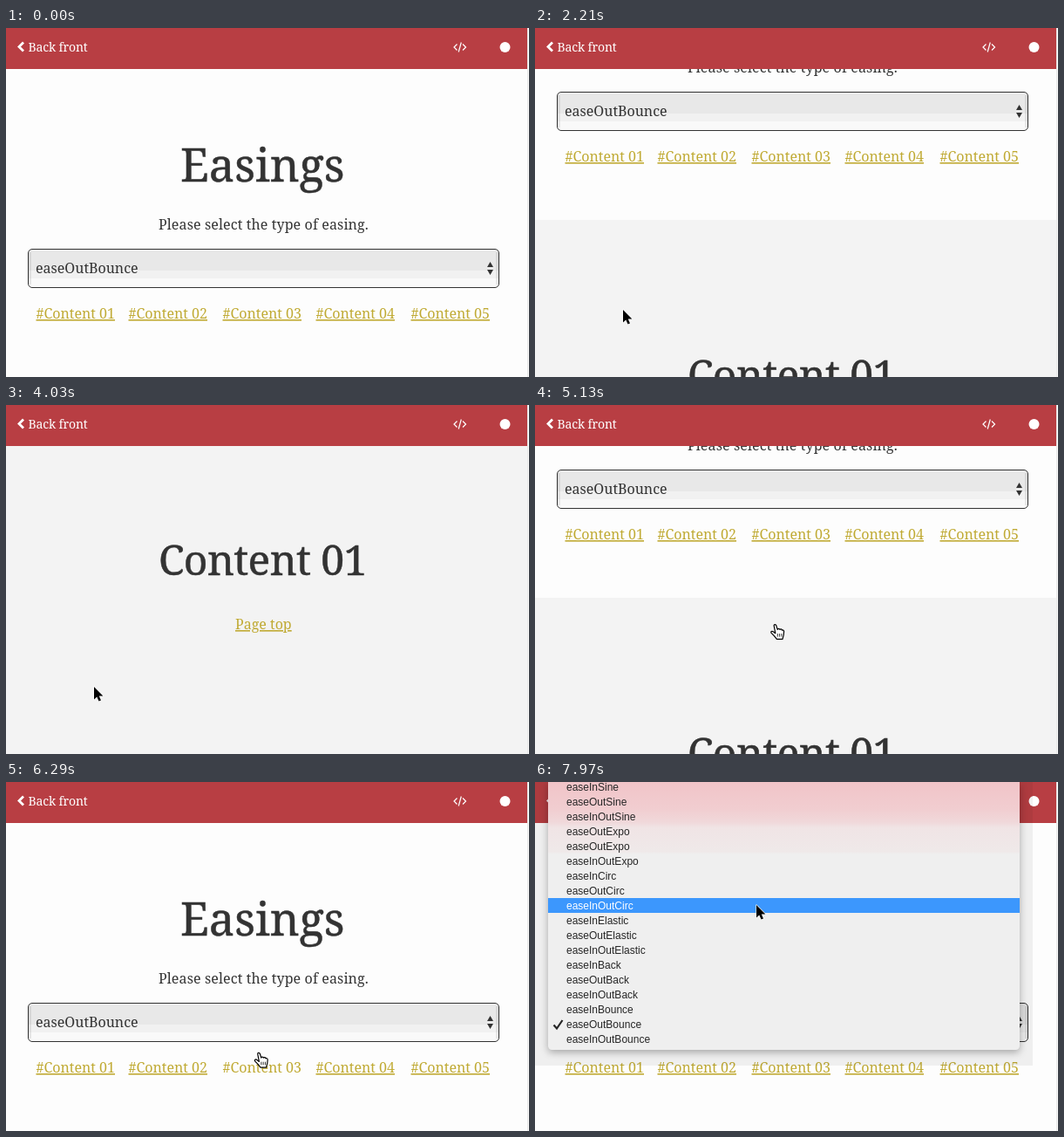
An HTML page that plays this animation: 600x400 px, repeating every 8 s.

```html
<!DOCTYPE html>
<html lang="en">
<head>
<meta charset="utf-8">
<title>Easings</title>
<style>
  html, body { margin: 0; width: 100%; height: 100%; overflow: hidden; background: #fdfdfd; }
  svg { display: block; }
  text { font: 16px "Noto Serif", serif; fill: #333; white-space: pre; }
  .title { stroke: #333; stroke-width: .5; }
  .link { fill: #c0aa33; text-decoration: underline 1px; text-underline-offset: 2px; }
  .link.hover { text-decoration: none; }
  #menu text { font: 12px "Liberation Sans", Arial, sans-serif; fill: #262626; }
  #menu text.on { fill: #fff; }
  #panel { filter: drop-shadow(0 3px 4px rgba(0, 0, 0, .3)); }
</style>
</head>
<body>
<svg width="600" height="400" viewBox="0 0 600 400">
  <defs>
    <linearGradient id="tint" x2="0" y2="1">
      <stop offset="0" stop-color="#f1c4c8"/>
      <stop offset=".1" stop-color="#f1cdd0"/>
      <stop offset=".15" stop-color="#f0d8da"/>
      <stop offset=".17" stop-color="#f0e4e5"/>
      <stop offset=".26" stop-color="#efe9e9"/>
      <stop offset=".27" stop-color="#efefef"/>
    </linearGradient>
  </defs>

  <g id="page">
    <rect width="598" height="400" fill="#fdfdfd"/>
    <text class="title" x="200" y="176" style="font-size:52.5px">Easings</text>
    <text x="175" y="231" letter-spacing=".12">Please select the type of easing.</text>
    <rect x="25.5" y="253.5" width="540" height="44" rx="4.5" fill="#f9f9f9"/>
    <path d="M26 287V258q0-4 4-4H561q4 0 4 4V287z" fill="#f1f1f1"/>
    <path d="M26 278V258q0-4 4-4H561q4 0 4 4V278z" fill="#e8e8e8"/>
    <path d="M27.5 257V294M563.5 257V294" stroke="#000" stroke-opacity=".07" stroke-width="3"/>
    <rect x="25.5" y="253.5" width="540" height="44" rx="4.5" fill="none" stroke="#333"/>
    <path d="M552 274l3.5-6 3.5 6zM552 277h7l-3.5 6z" fill="#333"/>
    <text x="34" y="281">easeOutBounce</text>
    <g id="links"></g>
    <g transform="translate(0 400)">
      <rect width="598" height="400" fill="#f3f3f3"/>
      <text class="title" x="175" y="195" style="font-size:48px" letter-spacing="-.6">Content 01</text>
      <text class="link" id="pageTop" x="263" y="257">Page top</text>
    </g>
  </g>

  <rect x="598" width="2" height="400" fill="#f7f7f7"/>
  <rect x="598" width="1" height="400" fill="#e9e9e9"/>
  <rect width="598" height="47" fill="#b83e43"/>
  <g fill="none" stroke="#fff">
    <path d="M20 16.5l-5 5 5 5" stroke-width="2.8"/>
    <path d="M517.5 18.5l-3.5 3.5 3.5 3.5M524 18.5l3.5 3.5-3.5 3.5M522.3 16.5l-3.1 11" stroke-width="1.2"/>
  </g>
  <circle cx="572.5" cy="22" r="6" fill="#fff"/>
  <text x="25.5" y="27" letter-spacing="-.15" style="font-size:14px;fill:#fff">Back front</text>

  <g id="menu">
    <path d="M0 0H571V325H0z" fill-opacity=".055"/>
    <path id="panel" d="M15 0H556V302q0 5-5 5H20q-5 0-5-5z" fill="url(#tint)"/>
    <rect id="bar" x="15" width="541" height="17" fill="#3c97fd"/>
    <path id="check" d="M21.5 278.5l3.5 4 6.5-9.5" fill="none" stroke-width="2.2"/>
  </g>

  <g id="cursor" stroke-linejoin="round">
    <path id="arrow" d="M0 0V14.5L3.3 11.4 5.5 16.6 8 15.5 5.8 10.5H10.4z" stroke="#fff" stroke-width="1.2" paint-order="stroke"/>
    <g id="hand" stroke="#000" stroke-width="1.2">
      <path d="M-.8 2.2C-1.2.4 1.2 0 1.8 1.8L3.2 6.4C3.6 5 5.6 5 5.9 6.5 6.6 5.5 8.1 5.7 8.4 7.1 9.6 6.5 10.7 7.3 10.6 8.8L10.2 12.6 9 17.4H2.4L-.6 13.6-3.8 10.4C-5 8.8-3.2 7.6-1.7 8.8L.8 10.7z" fill="#fff"/>
      <path d="M3.3 11v3.6M5.6 11v3.6M7.9 11v3.6" stroke-width=".8"/>
    </g>
  </g>
</svg>
<script>
const LOOP = 8000, PAGE = 400, SCROLL = 800, MENU_OPEN = 7220;
const $ = id => document.getElementById(id);

function addText(parent, content, x, y, className = "") {
  const el = document.createElementNS("http://www.w3.org/2000/svg", "text");
  el.textContent = content;
  el.setAttribute("x", x);
  el.setAttribute("y", y);
  el.setAttribute("class", className);
  parent.append(el);
  return el;
}

const links = [35, 141, 249, 356, 465].map((x, i) =>
  addText($("links"), "#Content 0" + (i + 1), x - .5, 333, "link"));

const names = ("InSine OutSine InOutSine OutExpo OutExpo InOutExpo InCirc OutCirc InOutCirc InElastic " +
  "OutElastic InOutElastic InBack OutBack InOutBack InBounce OutBounce InOutBounce").split(" ");
const rows = names.map((name, i) => addText($("menu"), "ease" + name, 36, 10 + 17 * i));
const selected = names.indexOf("OutBounce");

// Pointer positions: time, x, y
const path = [
  [600, 246, 404], [1250, 122, 306], [1460, 112, 317], [1740, 101, 323],
  [4150, 101, 323], [4650, 275, 251], [5780, 275, 251], [6170, 285, 303],
  [6500, 300, 325], [6630, 301, 327], [6870, 301, 327], [7040, 320, 271],
  [7570, 320, 271], [7970, 254, 141]
];

const clamp = v => Math.min(1, Math.max(0, v));
const smooth = v => v * v * (3 - 2 * v);
const within = (t, from, to) => t >= from && t < to;
const show = (el, on) => el.style.display = on ? "" : "none";
const move = (el, x, y) => el.setAttribute("transform", `translate(${x} ${y})`);

function easeOutBounce(t) {
  const bounce = (mid, base) => 7.5625 * (t - mid / 2.75) ** 2 + base;
  if (t < 1 / 2.75) return bounce(0, 0);
  if (t < 2 / 2.75) return bounce(1.5, .75);
  if (t < 2.5 / 2.75) return bounce(2.25, .9375);
  return bounce(2.625, .984375);
}

function pointerAt(t) {
  const i = path.findIndex(p => p[0] > t);
  if (i === 0) return path[0].slice(1);
  if (i < 0) return path.at(-1).slice(1);
  const [t0, x0, y0] = path[i - 1], [t1, x1, y1] = path[i];
  const k = smooth((t - t0) / (t1 - t0));
  return [x0 + (x1 - x0) * k, y0 + (y1 - y0) * k];
}

function draw(t) {
  const scrolled = easeOutBounce(clamp((t - 2016) / SCROLL)) - easeOutBounce(clamp((t - 4915) / SCROLL));
  move($("page"), 0, -Math.round(PAGE * scrolled));

  const overFirst = within(t, 1440, 2100), overTop = within(t, 4600, 5740), overThird = within(t, 6250, 6930);
  links[0].classList.toggle("hover", overFirst);
  links[2].classList.toggle("hover", overThird);
  $("pageTop").classList.toggle("hover", overTop);

  const [x, y] = pointerAt(t);
  const hand = overFirst || overTop || overThird;
  move($("cursor"), x, y);
  show($("hand"), hand);
  show($("arrow"), !hand);

  show($("menu"), t >= MENU_OPEN);
  const active = Math.floor((y + 3) / 17);
  $("bar").setAttribute("y", active * 17 - 3);
  rows.forEach((row, i) => row.classList.toggle("on", i === active));
  $("check").setAttribute("stroke", active === selected ? "#fff" : "#262626");
}

function tick() {
  draw(performance.now() % LOOP);
  requestAnimationFrame(tick);
}
tick();
</script>
</body>
</html>
```
